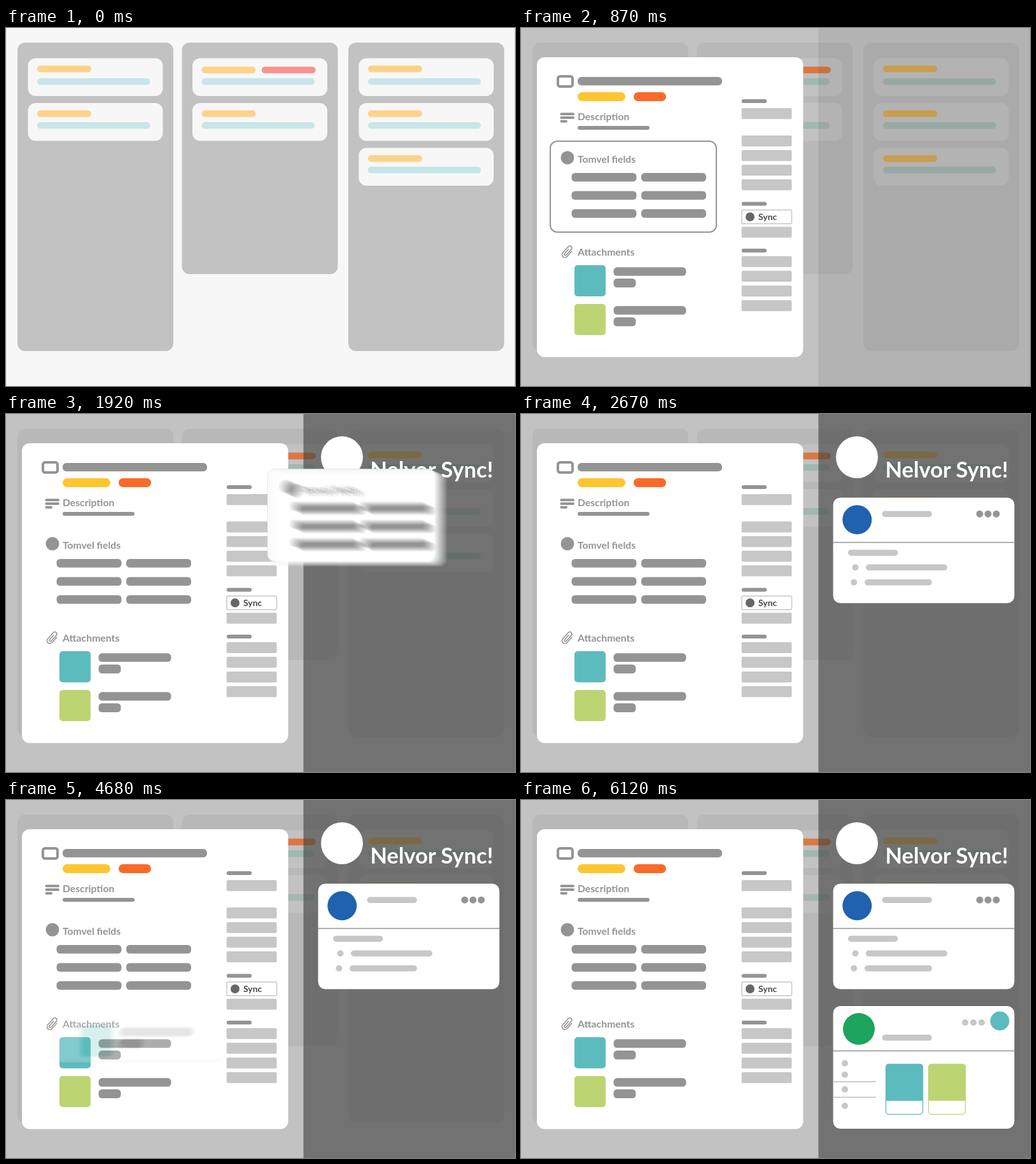
An HTML page for the animation above (9360 ms loop, 800 by 563 pixels).

```html
<!DOCTYPE html>
<html lang="en">
<head>
<meta charset="utf-8">
<title>Board sync</title>
<style>
html, body { margin: 0; width: 100%; height: 100%; overflow: hidden; background: #f7f7f7; }
svg { display: block; width: 100vw; height: 100vh; }
text { font-family: Lato, "Open Sans", sans-serif; font-weight: 700; }
</style>
</head>
<body>
<svg id="stage" viewBox="0 0 800 563" preserveAspectRatio="none"></svg>
<script>
const LOOP = 9360, STEP = 30, FLIGHT = 1000, SHUTTER = 26, COPIES = 8;
const GRAY = '#949494', LIGHT = '#c7c7c7', TEAL = '#5cbcbd', GREEN = '#bcd572';

// ---- shape helpers ----
const box = (x, y, w, h, r, fill, extra = '') =>
  `<rect x="${x}" y="${y}" width="${w}" height="${h}" rx="${r}" fill="${fill}" ${extra}/>`;
const pill = (x, y, w, h, fill) => box(x, y, w, h, h / 2, fill);
const dot = (x, y, r, fill) => `<circle cx="${x}" cy="${y}" r="${r}" fill="${fill}"/>`;
const line = (x1, x2, y, color = GRAY) =>
  `<path d="M${x1} ${y}H${x2}" stroke="${color}" stroke-width="1.4"/>`;
const label = (x, y, size, fill, str) =>
  `<text x="${x}" y="${y}" font-size="${size}" fill="${fill}">${str}</text>`;
const group = (id, body, extra = '') => `<g id="${id}" ${extra}>${body}</g>`;
const frame = (id, y, h) =>
  group(id, box(46, y, 261, h, 11, 'none', `stroke="${GRAY}" stroke-width="2"`));

// ---- board ----
const columns = [
  { x: 18, h: 485, cards: 2 },
  { x: 276.5, h: 364, cards: 2, alert: true },
  { x: 538, h: 485, cards: 3 }
];
const cardY = [47.5, 118, 188.5], tagY = [59, 129.5, 200], barY = [79, 148, 218];

function tags(yellow, teal, red) {
  return columns.map(c => {
    let s = '';
    for (let i = 0; i < c.cards; i++) {
      const lower = c.alert && i === 0 ? 1.7 : 0;
      s += pill(c.x + 31, tagY[i] + lower, 85, 10.6, yellow);
      s += pill(c.x + 31, barY[i], 177.5, 10.4, teal);
    }
    return s + (c.alert ? pill(c.x + 125.3, 60.7, 85, 10.6, red) : '');
  }).join('');
}

const board = box(0, 0, 800, 563, 0, '#f7f7f7') +
  box(0, 0, 1, 563, 0, '#e2e2e2') + box(799, 0, 1, 563, 0, '#e2e2e2') +
  columns.map(c => box(c.x, 23, 245, c.h, 12, '#c2c2c2') +
    cardY.slice(0, c.cards).map(y => box(c.x + 16.5, y, 212, 59.5, 12, '#f7f7f7')).join('')
  ).join('') + tags('#fdd28a', '#c8e6e7', '#f79490');

const shade = box(0, 0, 800, 563, 0, '#b7b7b7', 'opacity=".81"') +
  tags('#d9aa51', '#a2b7b2', '#db7840');

// ---- open card ----
const fields = dot(73, 204, 10.5, GRAY) + label(89, 212, 15.7, GRAY, 'Tomvel fields') +
  [228, 256.5, 285].map(y => box(79.5, y, 102, 13.5, 5.5, GRAY) + box(189, y, 102, 13.5, 5.5, GRAY)).join('');

const file = (y, color) => box(84, y, 49, 49, 5, color) +
  box(145.5, y + 3.3, 114, 13.5, 5.5, GRAY) + box(145.5, y + 21, 35, 14, 5.5, GRAY);

const syncButton = box(347, 286.3, 78.5, 21.4, 2, '#fff', `stroke="${LIGHT}" stroke-width="1.5"`) +
  dot(360, 297, 7, '#666') + label(373, 302, 14, '#484848', 'Sync');

const clip = `<path transform="translate(73 352) rotate(42)" fill="none" stroke="${GRAY}" stroke-width="1.6"
  stroke-linecap="round" d="M4.5 -5V6A4.5 4.5 0 0 1 -4.5 6V-7A3.2 3.2 0 0 1 2 -7V5A1.5 1.5 0 0 1 -1.4 5V-4"/>`;

const modal = box(25, 46, 418.5, 471.5, 12, '#fff') +
  box(58, 76, 23, 16, 3.5, '#fff', `stroke="${GRAY}" stroke-width="4"`) +
  box(89, 77, 227, 13.3, 6, GRAY) +
  pill(89, 101, 75, 14, '#fdc62f') + pill(177, 101, 51, 14, '#f96a2b') +
  pill(61.5, 133.3, 22.5, 4, GRAY) + pill(61.5, 139, 22.5, 4, GRAY) + pill(61.5, 144.8, 11.5, 4, GRAY) +
  label(89, 145, 15.7, GRAY, 'Description') + pill(89, 154, 113, 6, GRAY) +
  fields + clip + label(89, 358, 15.8, GRAY, 'Attachments') +
  file(373, TEAL) + file(434, GREEN) +
  [112, 273.5, 347].map(y => pill(346.8, y, 39.4, 6, GRAY)).join('') +
  [126, 169, 192, 215, 238, 312.6, 358.7, 381.8, 405, 428]
    .map(y => box(346.7, y, 78.8, 17.2, 2, LIGHT)).join('') +
  group('sync', syncButton);

// ---- right panel ----
const panelEdge = 'stroke="#666" stroke-width="1"';
const heading = dot(528, 68, 33, '#fff') + label(572.5, 100, 34.5, '#fff', 'Nelvor Sync!');

const contact = box(490, 131, 286, 167, 12, '#fff', panelEdge) + line(490, 776, 202) +
  dot(528.3, 166.2, 23, '#2062b0') + pill(567.5, 152.4, 78.5, 9.6, LIGHT) +
  [721, 734, 747].map(x => dot(x, 157.2, 5.5, GRAY)).join('') +
  pill(514, 213.4, 78.5, 9.6, LIGHT) +
  dot(525.5, 241.3, 5, LIGHT) + pill(542, 236.5, 128, 9.6, LIGHT) +
  dot(523.3, 264.8, 5, LIGHT) + pill(540, 260, 106, 9.6, LIGHT);

const doc = (x, color) => box(x, 415.3, 58, 79, 5, '#fff', `stroke="${color}" stroke-width="1.3"`) +
  `<path fill="${color}" d="M${x} 473V420q0 -5 5 -5h48q5 0 5 5V473z"/>`;

const drive = box(490, 323.5, 286, 194, 12, '#fff', panelEdge) + line(490, 776, 394.5) +
  dot(531, 360, 25, '#1da45f') + pill(567.5, 369, 78.5, 9.6, LIGHT) +
  [698, 711, 724].map(x => dot(x, 350, 5, LIGHT)).join('') + dot(752.5, 347.5, 15, TEAL) +
  [414, 432, 455, 481].map(y => dot(509, y, 5, LIGHT)).join('') +
  line(490, 558, 443, '#bdbdbd') + line(490, 558, 467.5, '#bdbdbd') +
  group('docA', doc(573.5, TEAL)) + group('docB', doc(640.5, GREEN));

// ---- pieces that fly across ----
const sheet = (y, h) => box(45, y, 263, h, 11, '#fff', 'stroke="#dcdcdc" stroke-width=".8"');
const flyers = [
  { id: 'flyFields', start: 1280, dx: 462, dy: -36, lift: 94, art: sheet(177, 145) + fields },
  { id: 'flyA', start: 4410, dx: 426, dy: 58, lift: 78, art: sheet(366, 62) + file(373, TEAL) },
  { id: 'flyB', start: 4843, dx: 492, dy: -3, lift: 54, art: sheet(427, 62) + file(434, GREEN) }
];
// Falling copy opacities average to an even motion blur.
const smear = f => Array.from({ length: COPIES },
  (_, i) => `<g opacity="${1 / (i + 1)}">${f.art}</g>`).join('');

document.getElementById('stage').innerHTML = board + group('shade', shade) +
  group('dark', box(467.5, 0, 332.5, 563, 0, '#3f3f3f')) + group('heading', heading) +
  group('modal', modal) + frame('frameFields', 178, 143) + frame('frameA', 367, 60) + frame('frameB', 428, 60) +
  group('contact', contact) + group('drive', drive) +
  flyers.map(f => group(f.id, smear(f))).join('');

// ---- motion ----
const el = id => document.getElementById(id);
const clamp = v => Math.min(1, Math.max(0, v));
const ramp = (t, a, b) => clamp((t - a) / (b - a));
const pulse = (t, a, b, c, d) => ramp(t, a, b) - ramp(t, c, d);
const ease = u => u < .5 ? 4 * u ** 3 : 1 - 4 * (1 - u) ** 3;

function show(id, alpha) {
  const node = el(id);
  node.setAttribute('opacity', alpha.toFixed(3));
  node.setAttribute('display', alpha > 0 ? 'inline' : 'none');
}

function fly(f, t) {
  const u = clamp((t - f.start) / FLIGHT);
  show(f.id, pulse(u, .2, .5, .66, .82));
  [...el(f.id).children].forEach((copy, i) => {
    const at = t + SHUTTER * (i / (COPIES - 1) - .5);
    const p = ease(clamp((at - f.start) / FLIGHT));
    const x = f.dx * p, y = f.dy * p - f.lift * 4 * p * (1 - p);
    copy.setAttribute('transform', `translate(${x.toFixed(2)} ${y.toFixed(2)})`);
  });
}

function draw(t) {
  show('shade', ramp(t, 0, 210));
  show('modal', ramp(t, 0, 210));
  show('frameFields', pulse(t, 420, 630, 870, 1080));
  show('dark', .6 * (t < 870 ? 0 : ramp(t, 840, 1000)));
  show('heading', ramp(t, 990, 1290));
  show('contact', ramp(t, 2070, 2670));

  const grow = 1 + .75 * Math.sin(Math.PI * ramp(t, 3270, 3630));
  el('sync').setAttribute('transform', `translate(386 297) scale(${grow}) translate(-386 -297)`);
  show('frameA', pulse(t, 3600, 3810, 3990, 4260));
  show('frameB', pulse(t, 3990, 4260, 4410, 4590));

  show('drive', ramp(t, 4980, 5370));
  show('docA', ramp(t, 5160, 5540));
  show('docB', ramp(t, 5610, 6120));
  flyers.forEach(f => fly(f, t));
}

const origin = performance.now();
function tick() {
  const t = (performance.now() - origin) % LOOP;
  draw(Math.floor(t / STEP) * STEP);
  requestAnimationFrame(tick);
}
draw(0);
requestAnimationFrame(tick);
</script>
</body>
</html>
```
